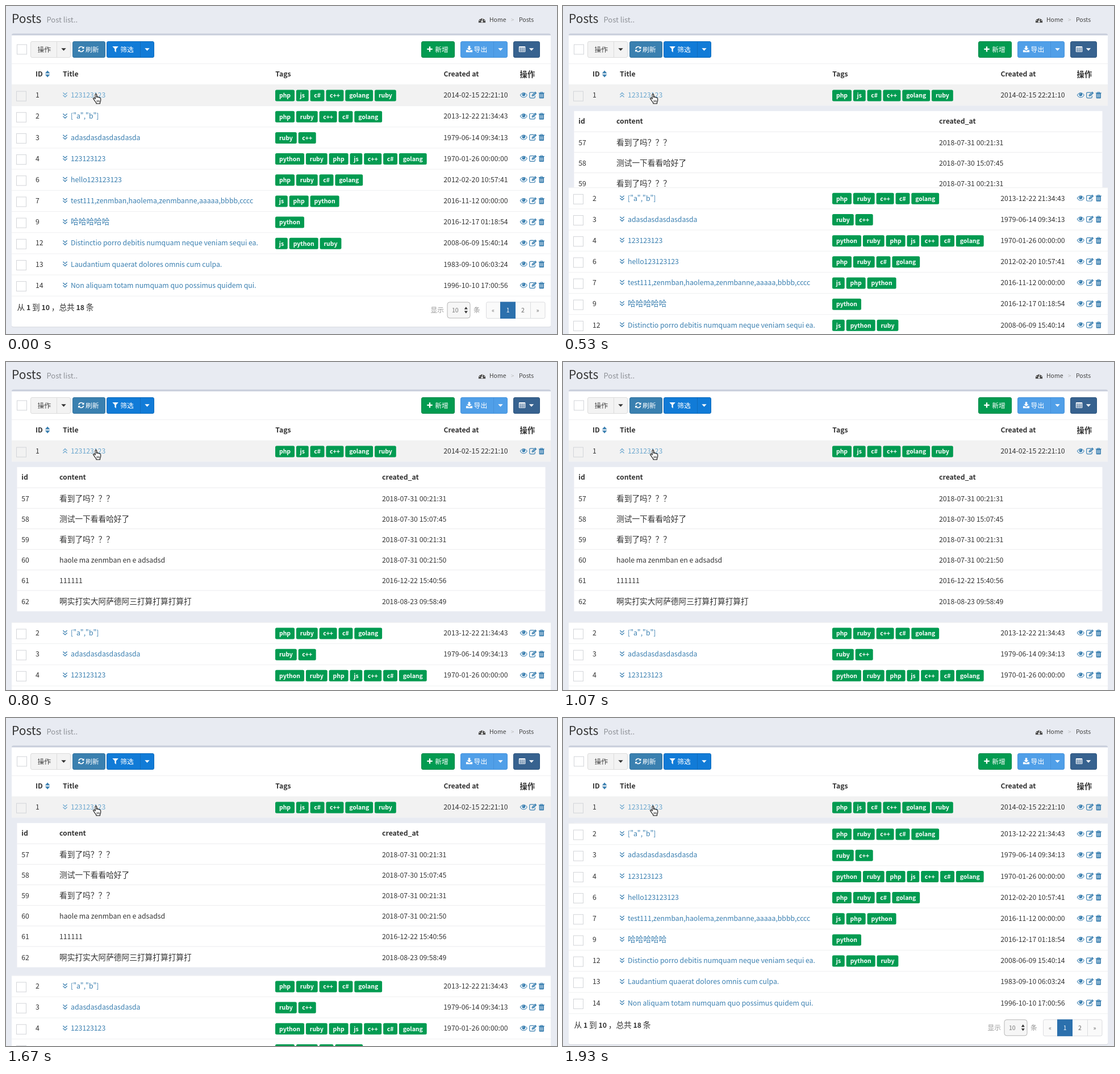
An HTML page for the animation above (1.99 s loop, 970 by 577 pixels).

```html
<!DOCTYPE html>
<html lang="zh-CN">
<head>
<meta charset="utf-8">
<title>Posts</title>
<style>
  html, body { margin: 0; width: 100%; height: 100%; overflow: hidden; background: #e8ebf2; }
  svg { display: block; width: 970px; height: 577px; }
  text { font-family: "Noto Sans CJK SC", "Noto Sans CJK JP", "Noto Sans CJK", "Open Sans", sans-serif; white-space: pre; }
</style>
</head>
<body>
<svg id="stage" viewBox="0 0 970 577" xmlns="http://www.w3.org/2000/svg"></svg>
<script>
const PAGE = '#e8ebf2', INK = '#333', LINK = '#3a7fb0', HOVER_LINK = '#6ba7cf', GREEN = '#029b51', LINE = '#eff0f1';
const ROW_TOP = 138, ROW_H = 37.17, DETAIL_TOP = 175.2, DETAIL_H = 282.7;
const LOOP = 1990, OPEN_AT = 429, OPEN_MS = 350, CLOSE_AT = 1655, CLOSE_MS = 364;

const posts = [
  [1, '123123123', 'php js c# c++ golang ruby', '2014-02-15 22:21:10'],
  [2, '["a","b"]', 'php ruby c++ c# golang', '2013-12-22 21:34:43'],
  [3, 'adasdasdasdasdasda', 'ruby c++', '1979-06-14 09:34:13'],
  [4, '123123123', 'python ruby php js c++ c# golang', '1970-01-26 00:00:00'],
  [6, 'hello123123123', 'php ruby c# golang', '2012-02-20 10:57:41'],
  [7, 'test111,zenmban,haolema,zenmbanne,aaaaa,bbbb,cccc', 'js php python', '2016-11-12 00:00:00'],
  [9, '哈哈哈哈哈', 'python', '2016-12-17 01:18:54'],
  [12, 'Distinctio porro debitis numquam neque veniam sequi ea.', 'js python ruby', '2008-06-09 15:40:14'],
  [13, 'Laudantium quaerat dolores omnis cum culpa.', '', '1983-09-10 06:03:24'],
  [14, 'Non aliquam totam numquam quo possimus quidem qui.', '', '1996-10-10 17:00:56'],
];
const comments = [
  [57, '看到了吗？？？', '2018-07-31 00:21:31'],
  [58, '测试一下看看哈好了', '2018-07-30 15:07:45'],
  [59, '看到了吗？？？', '2018-07-31 00:21:31'],
  [60, 'haole ma zenmban en e adsadsd', '2018-07-31 00:21:50'],
  [61, '111111', '2016-12-22 15:40:56'],
  [62, '啊实打实大阿萨德阿三打算打算打算打', '2018-08-23 09:58:49'],
];
const tagWidth = { php: 34, js: 21.8, 'c#': 24.9, 'c++': 31, golang: 48.8, ruby: 37.8, python: 51 };

// Latin glyphs are set smaller than the Chinese ones beside them; *x* is bold.
function text(x, y, str, { size = 13.7, fill = INK, weight = 400, anchor = 'start' } = {}) {
  const spans = str.split('*').map((part, i) =>
    part.split(/([\u3000-\u9fff\uff00-\uffef]+)/).filter(Boolean).map(run => {
      const px = /[\u3000-\uffef]/.test(run) ? size : size * .895;
      return `<tspan font-size="${px.toFixed(2)}" font-weight="${i % 2 ? 700 : weight}">${run}</tspan>`;
    }).join('')).join('');
  return `<text x="${x}" y="${y}" fill="${fill}" text-anchor="${anchor}">${spans}</text>`;
}
const bold = (x, y, str) => text(x, y, str, { weight: 700 });
const rect = (x, y, w, h, fill, extra = '') => `<rect x="${x}" y="${y}" width="${w}" height="${h}" fill="${fill}" ${extra}/>`;
const path = (d, fill, extra = '') => `<path d="${d}" fill="${fill}" ${extra}/>`;
const stroke = (d, color, width) => path(d, 'none', `stroke="${color}" stroke-width="${width}"`);
const at = (x, y, body) => `<g transform="translate(${x} ${y})">${body}</g>`;
const hline = (y, x = 10, w = 949) => rect(x, y, w, 1, LINE);
const checkbox = (x, y) => rect(x + .5, y + .5, 17, 17, 'none', 'stroke="#d3d5d9"');
const caret = (x, color) => path(`M${x - 4.2} 74.3h8.4l-4.2 4.4z`, color);

function button(x, w, fill, edge, split) {
  return rect(x + .5, 62.5, w - 1, 28, fill, `rx="2.5" stroke="${edge}"`) +
    (split ? rect(split, 62.5, 1, 28, edge) : '');
}
const buttonText = (x, str, fill = '#fff') => text(x, 80.6, str, { size: 11.8, fill });

const chevrons = down => {
  const s = down ? 1 : -1;
  return stroke(`M-3.6 ${-4 * s}l3.6 ${3.4 * s}l3.6 ${-3.4 * s}M-3.6 ${.3 * s}l3.6 ${3.4 * s}l3.6 ${-3.4 * s}`, 'currentColor', 1.3);
};

const actions =
  at(911.3, 0, path('M-6.6 0Q-3.6-4.5 0-4.5T6.6 0Q3.6 4.5 0 4.5T-6.6 0z', LINK) +
    path('M-5.4 0Q-4-2.3-2.2-3Q-3.4-1.4-3-.2A3.1 3.1 0 0 0 3-.2Q3.4-1.5 2.2-3Q4-2.3 5.4 0Q3 3.5 0 3.5T-5.4 0z', '#fff') +
    path('M-1.7-1.2Q-1.4-2.7 0-2.8', 'none', 'stroke="#fff" stroke-width=".8"')) +
  at(921, 0, stroke('M8.5-4.6H2.4Q.7-4.6.7-2.9V3.4Q.7 5.1 2.4 5.1H8.6Q10.3 5.1 10.3 3.4V1', LINK, 1.2) +
    path('M4.6 2.4V-.1L10.7-6.1L13.3-3.5L7.2 2.4z', LINK) + stroke('M5.6.6L6.6 1.6M6.6.1L10.6-3.9', '#fff', .7)) +
  at(942.8, 0, path('M-5-4.3H-2.4L-1.8-5.8H1.8L2.4-4.3H5V-3.1H4.2V4.6Q4.2 5.9 3 5.9H-3Q-4.2 5.9-4.2 4.6V-3.1H-5z', LINK) +
    stroke('M-2.1-1.8V4M0-1.8V4M2.1-1.8V4', '#fff', .8) + stroke('M-1.3-4.7H1.3', '#fff', .7));

function tags(names, y) {
  let x = 474;
  return names.split(' ').filter(Boolean).map(name => {
    const w = tagWidth[name], left = x;
    x += w + 2.9;
    return rect(left, y, w, 20, GREEN, 'rx="2.5"') +
      text(left + w / 2, y + 13.8, name, { size: 11.7, fill: '#fff', weight: 700, anchor: 'middle' });
  }).join('');
}

function postRow([id, title, names, date], i) {
  const top = ROW_TOP + i * ROW_H, base = top + 23.3, color = i ? LINK : HOVER_LINK;
  return (i ? '' : rect(10, top, 949, ROW_H, '#f2f2f2')) + hline(top) + checkbox(18, top + 11.6) +
    text(52, base, String(id)) +
    `<g ${i ? '' : 'id="arrow"'} color="${color}" transform="translate(104 ${top + 18.4})">${chevrons(true)}</g>` +
    text(114, base, title, { fill: color }) + tags(names, top + 9.6) +
    text(770.3, base, date) + at(0, top + 18.7, actions);
}

function header() {
  const gauge = path('M-6.2 4.6A6.3 6.3 0 1 1 6.2 4.6z', '#444') +
    stroke('M-.2 2.6L1-2.5', '#fff', 1.1) + '<circle cy="2.6" r="1.5" fill="#fff"/>' +
    [[-4, 1], [-2.8, -2], [3.1, -1.8], [4, 1]].map(([x, y]) => `<circle cx="${x}" cy="${y}" r=".8" fill="#fff"/>`).join('');
  return text(10, 29.8, 'Posts', { size: 23.4 }) +
    text(71.5, 29, 'Post list..', { size: 14.5, fill: '#8e9197', weight: 300 }) +
    at(838, 24.6, gauge) + text(851, 28.4, 'Home', { size: 11.7, fill: '#444' }) +
    text(889, 28, '&gt;', { size: 11, fill: '#bbb' }) + text(903, 28.4, 'Posts', { size: 11.7, fill: '#444' });
}

function toolbar() {
  const refresh = stroke('M-4.2-1A4.3 4.3 0 0 1 3.4-2.8M4.2 1A4.3 4.3 0 0 1-3.4 2.8', '#fff', 1.6) +
    path('M5.2-5V-1H1.2zM-5.2 5V1H-1.2z', '#fff');
  const download = path('M-1.7-5.5H1.7V-1.6H4.2L0 2.5L-4.2-1.6H-1.7z', '#fff') +
    path('M-5.6 1.8H-2.6L0 4L2.6 1.8H5.6V5.4H-5.6z', '#fff');
  const grid = rect(-5.7, -5, 11.4, 10, '#fff', 'rx="1"') +
    [-4.6, -1.3, 2].map(x => [-2.6, 0, 2.5].map(y => rect(x, y, 2.6, 1.6, '#37628f')).join('')).join('');
  return checkbox(19, 67.4) +
    button(43, 71, '#f3f3f3', '#dcdcdc', 89) + buttonText(55.4, '操作', '#444') + caret(101.5, '#333') +
    button(117, 58, '#3a80b0', '#35749f') + at(132.3, 76, refresh) + buttonText(140, '刷新') +
    button(177, 84, '#117bd7', '#0f6cbd', 236) + path('M187.3 71h10.6l-4.1 4.6v5.8l-2.4-1.9v-3.9z', '#fff') +
    buttonText(201.3, '筛选') + caret(248.5, '#fff') +
    button(731, 59, GREEN, '#03884a') + stroke('M746 71.2v9.4M741.3 75.9h9.4', '#fff', 2.3) + buttonText(755.2, '新增') +
    button(800, 83, '#509fe8', '#4693dc', 858) + at(815.5, 75.8, download) + buttonText(823.6, '导出') + caret(870.5, '#fff') +
    button(893, 47, '#37628f', '#30577f') + at(908.6, 76, grid) + caret(925, '#fff');
}

function tableHead() {
  return hline(101) + bold(52, 124.3, 'ID') +
    path('M68.8 118.4l4.3-4.9l4.3 4.9zM68.8 120.6l4.3 4.9l4.3-4.9z', LINK) +
    bold(100, 124.3, 'Title') + bold(474.3, 124.3, 'Tags') + bold(770.4, 124.3, 'Created at') +
    text(904.6, 124.6, '操作', { weight: 700, size: 13.4 });
}

function detail() {
  const rows = comments.map(([id, content, date], i) => {
    const y = 221.2 + i * 36.17;
    return rect(19.5, y - .5, 930, 1, '#ececee') + text(27.3, y + 23.6, String(id)) +
      text(94, y + 23.6, content) + text(662, y + 23.6, date);
  }).join('');
  return rect(10, DETAIL_TOP, 949, DETAIL_H, PAGE) + rect(19.5, 184.8, 930, 253.7, '#fff') +
    bold(27.3, 207.4, 'id') + bold(94, 207.4, 'content') + bold(662, 207.4, 'created_at') + rows;
}

function footer() {
  const small = (x, str, fill = '#666', anchor = 'middle') => text(x, 539, str, { size: 11.7, fill, anchor });
  return hline(509.7) + text(19.6, 535.4, '从 *1* 到 *10* ，总共 *18* 条') +
    small(747.6, '显示', '#999', 'start') + small(823, '条', '#999', 'start') +
    rect(777, 521, 40, 28, '#f6f6f6', 'rx="4" stroke="#b5b5b5"') + small(785, '10', '#777', 'start') +
    path('M806.8 533.6l3-4.4l3 4.4zM806.8 536.4l3 4.4l3-4.4z', '#333') +
    rect(845.5, 520.9, 103.5, 28.6, '#fafafa', 'rx="2.5" stroke="#dcdde0"') +
    rect(923, 521, 1, 28.5, '#dcdde0') + rect(870, 520.4, 27, 29.6, '#2b70ad') +
    small(857.5, '«', '#777') + small(883.6, '1', '#fff') + small(910, '2') + small(936, '»');
}

const cursor = at(153, 154, path(
  'M4.1 1.9Q4.2.6 5.3.6T6.6 1.9V6.4Q7-.0 7 6.2Q8.8 5.3 9.3 6.8Q11.2 6 11.7 7.6Q13.6 7.3 13.7 9.2V12Q13.6 14 12.5 15.4V17.8H5.9V16.1Q4 14.2 2.9 12.2L.8 9.4Q.1 8.2 1.2 7.7T3.1 8.4L4.1 9.5z',
  '#fff', 'stroke="#111" stroke-width="1.1" stroke-linejoin="round"') +
  stroke('M7.2 11.6v3.4M9.2 11.6v3.4M11.2 11.6v3.4', '#111', .8));

const rows = posts.map(postRow);
document.getElementById('stage').innerHTML =
  `<clipPath id="clip"><rect id="window" x="0" y="${DETAIL_TOP}" width="970" height="0"/></clipPath>` +
  rect(0, 0, 970, 577, PAGE) + header() +
  rect(10, 48.6, 949, 20, '#c8cedb', 'rx="3"') + rect(10, 51.6, 949, 124, '#fff') +
  toolbar() + tableHead() + rows[0] +
  `<g clip-path="url(#clip)">${detail()}</g>` +
  `<g id="lower">${path('M10 175.2H959V562.3q0 3-3 3H13q-3 0-3-3z', '#d3d6dd')}` +
  path('M10 175.2H959V561.3q0 3-3 3H13q-3 0-3-3z', '#fff') +
  `${rows.slice(1).join('')}${footer()}</g>` + cursor;

const [arrow, pane, lower] = ['arrow', 'window', 'lower'].map(id => document.getElementById(id));

// CSS "ease": cubic-bezier(.25, .1, .25, 1)
function ease(u) {
  if (u <= 0 || u >= 1) return u <= 0 ? 0 : 1;
  let lo = 0, hi = 1, s = .5;
  for (let i = 0; i < 24; i++) {
    s = (lo + hi) / 2;
    if (.75 * s * (1 - s) + s ** 3 < u) lo = s; else hi = s;
  }
  return .3 * s * (1 - s) ** 2 + 3 * s * s * (1 - s) + s ** 3;
}

// The picture advances at 15 steps a second, on 10 ms ticks.
const stepTime = t => Math.floor((Math.floor(t / 10) * 10 + 4) * .015) / .015;

function draw(now) {
  const t = stepTime(now % LOOP);
  const height = DETAIL_H * (ease((t - OPEN_AT) / OPEN_MS) - ease((t - CLOSE_AT) / CLOSE_MS));
  pane.setAttribute('height', height);
  lower.setAttribute('transform', `translate(0 ${height})`);
  arrow.innerHTML = chevrons(t < OPEN_AT || t >= CLOSE_AT);
}

const start = performance.now();
function tick() {
  draw(performance.now() - start);
  requestAnimationFrame(tick);
}
tick();
</script>
</body>
</html>
```
